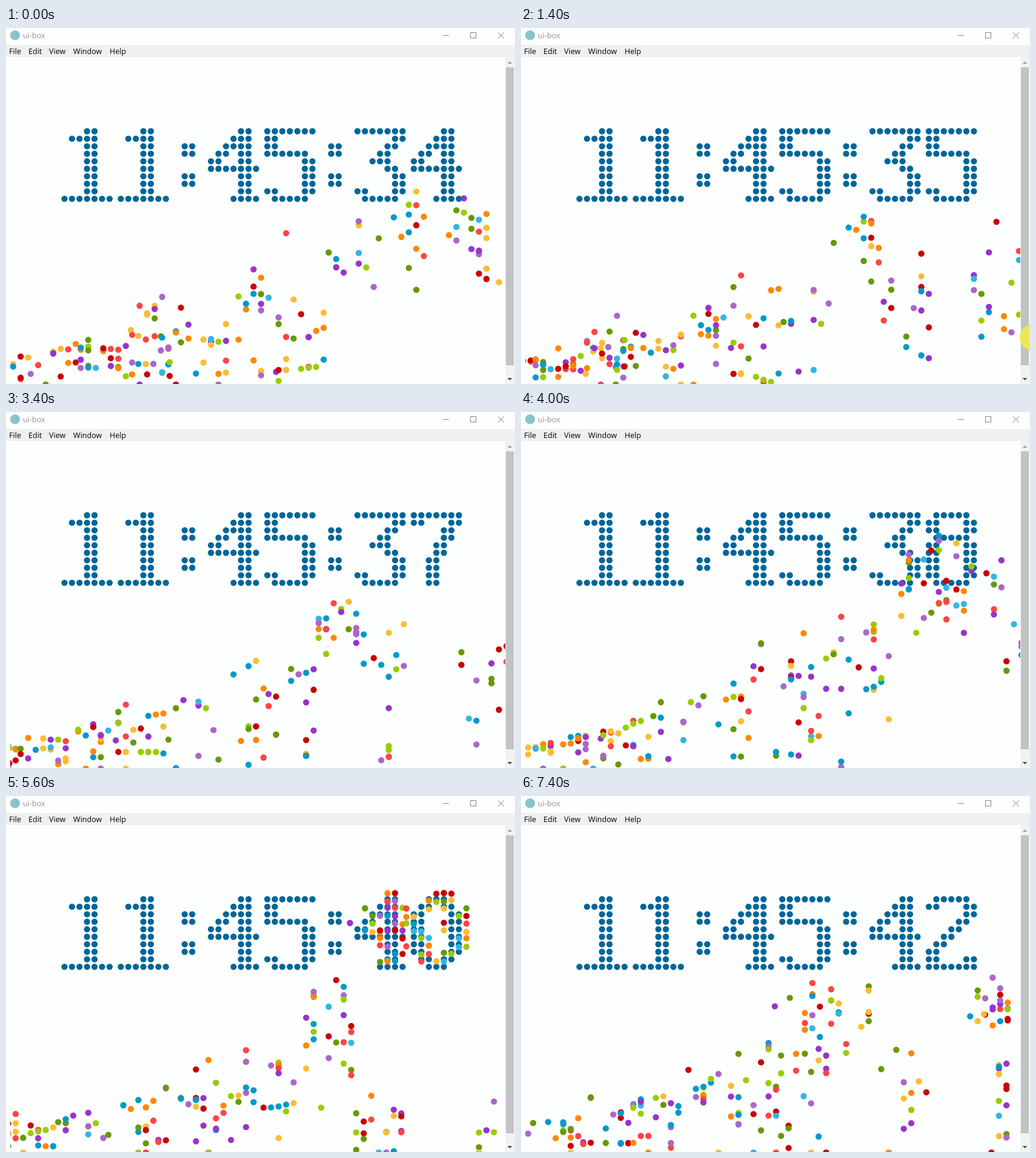
Write an HTML page with a canvas that moves like this. It is 840x588 px and loops after 7600 ms.

```html
<!DOCTYPE html>
<html lang="en">
<head>
<meta charset="utf-8">
<title>Dot clock</title>
<style>
  html, body { margin: 0; width: 100%; height: 100%; overflow: hidden; background: #fdfefe; }
  canvas { position: absolute; left: 0; top: 0; }
  span {
    position: absolute; white-space: nowrap; color: #111;
    font: 12.5px/18px "Noto Sans", "Open Sans", sans-serif;
  }
  .title { left: 28px; top: 4px; color: #999; }
  .menu { top: 30px; }
</style>
</head>
<body>
<canvas id="stage" width="840" height="588"></canvas>
<span class="title">ui-box</span>
<span class="menu" style="left:5px">File</span>
<span class="menu" style="left:37px">Edit</span>
<span class="menu" style="left:71px">View</span>
<span class="menu" style="left:111px">Window</span>
<span class="menu" style="left:171px">Help</span>
<script>
const ctx = document.getElementById('stage').getContext('2d');
const LOOP = 7600, STEP = 200;
const UNIT = 840 / 813;            // page pixels per layout pixel
const GAP = 12 * UNIT, R = 5 * UNIT;
const LEFT = 96.5, TOP = 170.5, FLOOR = 589;
const PAGE = '#fdfefe';
const COLORS = ['#33b5e5', '#0099cc', '#aa66cc', '#9933cc', '#99cc00',
                '#669900', '#ffbb33', '#ff8800', '#ff4444', '#cc0000'];

// Strokes of a pen two dots wide; each corner is written as column and row.
const STROKES = {
  0: '20 02 07 29/30 52 57 39',
  1: '11 31/30 39/09 59',
  2: '01 10 40 51 52 07 09 59 58',
  3: '00 50 51 24 34 56 58 49 19 08',
  4: '55 05 04 40 49 39 59',
  5: '50 00 03 43 54 58 49 19 08',
  6: '40 21 03 08 19 49 58 55 44 34',
  7: '01 00 50 51 42 43 34 35 26 29',
  8: '13 02 01 10 40 51 52 43 54 58 49 19 08 04 13 43',
  9: '24 14 03 01 10 40 51 56 38 19',
  ':': '12 13/16 17'
};

// Cells covered by a glyph, as [column, row].
function trace(strokes) {
  const cells = new Map();
  for (const stroke of strokes.split('/')) {
    const points = stroke.split(' ').map(p => [+p[0], +p[1]]);
    for (let k = 1; k < points.length; k++) {
      const [x, y] = points[k - 1];
      const dx = points[k][0] - x, dy = points[k][1] - y;
      const n = Math.abs(dy || dx);
      for (let i = 0; i <= n; i++) {
        const col = x + dx * i / n, row = y + dy * i / n;
        for (const c of [col, col + 1]) cells.set(row * 7 + c, [c, row]);
      }
    }
  }
  return [...cells.values()];
}
const GLYPHS = {};
for (const c in STROKES) GLYPHS[c] = trace(STROKES[c]);

// Left edge of character i: digits advance 15 half-gaps, colons 9.
const slot = i => LEFT + (15 * i - 6 * Math.floor(i / 3)) * GAP / 2;

// The simulation starts a little slowly, then runs four ticks per picture.
const tickAt = step => 4 * step - Math.min(step, 4);
const birthOf = second => Math.floor(19.8 * (second - 34) - 13.5);

let seed = 4535;
function random() {
  seed = (seed + 0x6d2b79f5) | 0;
  let n = Math.imul(seed ^ (seed >>> 15), 1 | seed);
  n = (n + Math.imul(n ^ (n >>> 7), 61 | n)) ^ n;
  return ((n ^ (n >>> 14)) >>> 0) / 4294967296;
}

function eachDot(char, i, visit) {
  for (const [col, row] of GLYPHS[char]) visit(slot(i) + col * GAP, TOP + row * GAP);
}

const balls = [];
for (let second = 26; second <= 41; second++) {
  const launch = (x, y) => balls.push({
    birth: birthOf(second), x, y,
    g: 1.5 + random(),
    vx: random() < 0.5 ? -4 : 4,
    color: COLORS[Math.floor(random() * COLORS.length)]
  });
  if (second % 10 === 0) eachDot(second / 10, 6, launch);
  eachDot(second % 10, 7, launch);
}

function heightAt(ball, age) {
  let y = ball.y, vy = -5;
  for (let i = 0; i < age; i++) {
    y += vy * UNIT;
    vy += ball.g;
    if (y >= FLOOR) {
      y = FLOOR;
      vy *= -0.75;
    }
  }
  return y;
}

function rect(x, y, w, h, color) {
  ctx.fillStyle = color;
  ctx.fillRect(x, y, w, h);
}

function disc(x, y, r, color) {
  ctx.fillStyle = color;
  ctx.beginPath();
  ctx.arc(x, y, r, 0, Math.PI * 2);
  ctx.fill();
}

function arrow(y, dir, color) {
  ctx.fillStyle = color;
  ctx.beginPath();
  ctx.moveTo(827.5, y);
  ctx.lineTo(835.5, y);
  ctx.lineTo(831.5, y + 4 * dir);
  ctx.fill();
}

function drawWindow() {
  rect(0, 0, 840, 588, PAGE);
  rect(0, 28, 840, 20, '#eff0ef');
  disc(15, 12, 8, '#86c5c8');
  ctx.strokeStyle = '#888';
  ctx.lineWidth = 1;
  ctx.strokeRect(766.5, 7.5, 9, 9);
  ctx.beginPath();
  ctx.moveTo(721, 12.5); ctx.lineTo(731, 12.5);
  ctx.moveTo(812, 7.5); ctx.lineTo(822, 17);
  ctx.moveTo(822, 7.5); ctx.lineTo(812, 17);
  ctx.stroke();
}

function drawScrollbar() {
  rect(824, 48, 16, 540, '#f1f2f2');
  rect(825, 65, 13, 492, '#c0c2c3');
  arrow(59, -1, '#a3a3a3');
  arrow(578, 1, '#505050');
}

function drawClock(second) {
  const dot = (x, y) => disc(x, y, R, '#006699');
  [...('11:45:' + second)].forEach((char, i) => eachDot(char, i, dot));
}

function drawBalls(tick) {
  ctx.save();
  ctx.beginPath();
  ctx.rect(7, 56, 817, 532);
  ctx.clip();
  for (const ball of balls) {
    const age = tick - ball.birth;
    const x = ball.x + ball.vx * UNIT * age;
    if (age < 0 || x < -R || x > 840) continue;
    disc(x, heightAt(ball, age), R, ball.color);
  }
  ctx.restore();
}

function draw(step) {
  const tick = tickAt(step);
  let second = 34;
  while (birthOf(second + 1) <= tick) second++;
  drawWindow();
  drawClock(second);
  drawBalls(tick);
  drawScrollbar();
  if (step === 7) disc(845, 511, 22, 'rgba(240, 238, 70, 0.85)'); // pointer halo
}

const start = performance.now();
let shown = -1;
function frame() {
  const step = Math.floor(((performance.now() - start) % LOOP) / STEP);
  if (step !== shown) draw(shown = step);
  requestAnimationFrame(frame);
}
frame();
</script>
</body>
</html>
```
